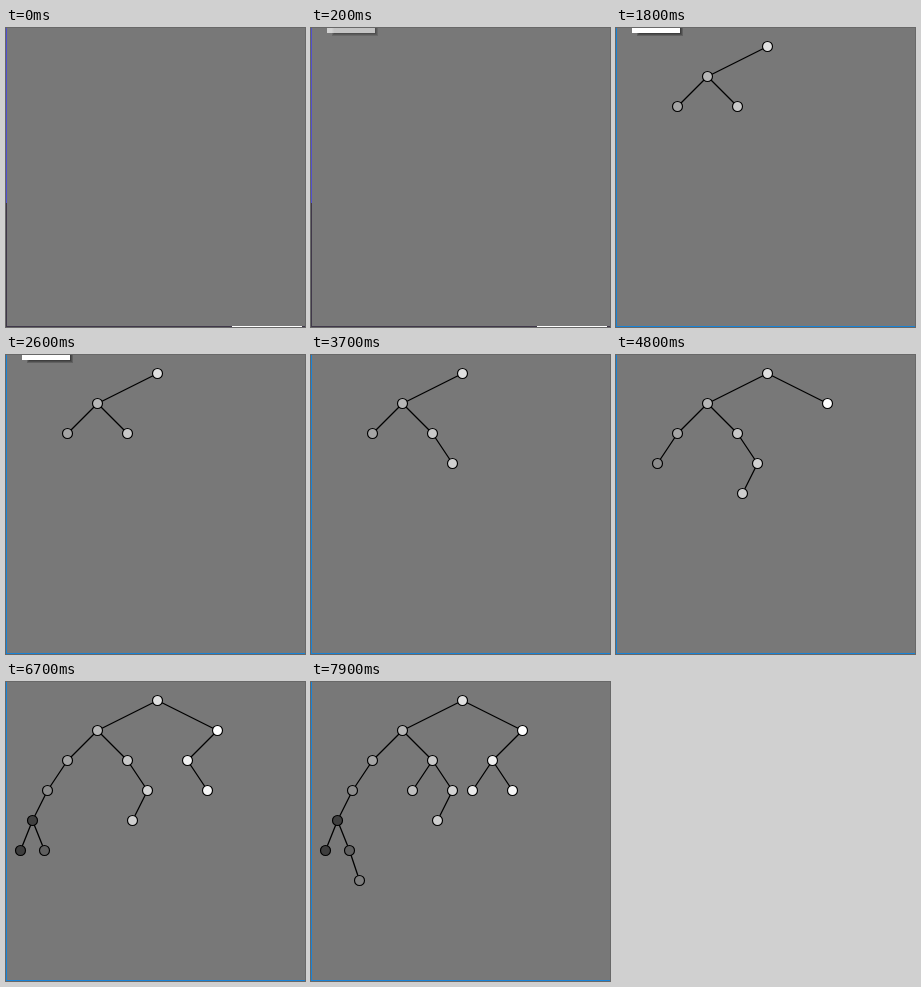
Animation of 299 by 299 pixels, one loop 8 s. Source, as an HTML page with a canvas:

```html
<!DOCTYPE html>
<html lang="en">
<head>
<meta charset="utf-8">
<title>Growing binary tree</title>
<style>
html, body { margin: 0; width: 100%; height: 100%; overflow: hidden; background: #787878; }
canvas { display: block; }
</style>
</head>
<body>
<canvas id="stage" width="299" height="299"></canvas>
<script>
const ctx = document.getElementById('stage').getContext('2d');
const SIZE = 299, EDGE = SIZE - 1, LOOP = 8000;
const ROW = 30, SPREAD = 60, RADIUS = 5, ACTIVE = 600;

// Insertion time in ms : key, which is also the grey level
const inserts = {
  600: 224, 1100: 182, 1500: 200, 1800: 164, 3700: 210, 4100: 140, 4400: 206, 4800: 255,
  5200: 64, 5600: 96, 6000: 240, 6300: 246, 6700: 62, 7100: 234, 7500: 126, 7900: 190
};

// Binary search tree: each level steps down one row and SPREAD / level sideways
function insert(root, time, key) {
  let parent = null, node = root, level = 0, x = 151.5;
  while (node) {
    const side = key < node.key ? 'left' : 'right';
    level++;
    x = node.x + (side === 'left' ? -1 : 1) * SPREAD / level;
    parent = node;
    node = node[side];
    if (!node) {
      return parent[side] = { time, key, parent, x, y: 18.5 + level * ROW };
    }
  }
  return { time, key, parent, x, y: 18.5 };
}

const nodes = [];
for (const [time, key] of Object.entries(inserts)) {
  nodes.push(insert(nodes[0], +time, key));
}

function rect(color, x, y, w, h) {
  ctx.fillStyle = color;
  ctx.fillRect(x, y, w, h);
}

function drawBorder(t) {
  const active = t >= ACTIVE;
  rect(active ? '#1883d7' : '#40384a', 0, 0, 1, SIZE);
  rect(active ? '#1883d7' : '#40384a', 0, EDGE, SIZE, 1);
  if (active) return;
  rect('#5050d0', 0, 0, 1, 175);
  rect('#fff', 226, EDGE, 70, 1);
}

// Lower edge of a tooltip that fades in by steps
function drawTip(t) {
  if (t < 100 || t >= 3100) return;
  ctx.globalAlpha = Math.min(3, Math.floor(t / 100)) / 3;
  for (let i = 0; i < 3; i++) {
    rect('rgba(0,0,0,0.2)', 21 + i, 0, 46 - 2 * i, 8 - i);
  }
  rect('#fff', 16, 0, 48, 5);
  ctx.globalAlpha = 1;
}

function drawTree(t) {
  const shown = nodes.filter(n => t >= n.time);
  ctx.strokeStyle = '#000';
  ctx.lineWidth = 1.3;
  ctx.beginPath();
  for (const { parent, x, y } of shown) {
    if (!parent) continue;
    ctx.moveTo(parent.x, parent.y);
    ctx.lineTo(x, y);
  }
  ctx.stroke();
  ctx.lineWidth = 1.15;
  for (const { x, y, key } of shown) {
    ctx.fillStyle = `rgb(${key},${key},${key})`;
    ctx.beginPath();
    ctx.arc(x, y, RADIUS, 0, Math.PI * 2);
    ctx.fill();
    ctx.stroke();
  }
}

function draw(now) {
  const t = now % LOOP;
  rect('#787878', 0, 0, SIZE, SIZE);
  drawBorder(t);
  drawTip(t);
  drawTree(t);
}

const start = performance.now();
function tick() {
  draw(performance.now() - start);
  requestAnimationFrame(tick);
}
tick();
</script>
</body>
</html>
```
